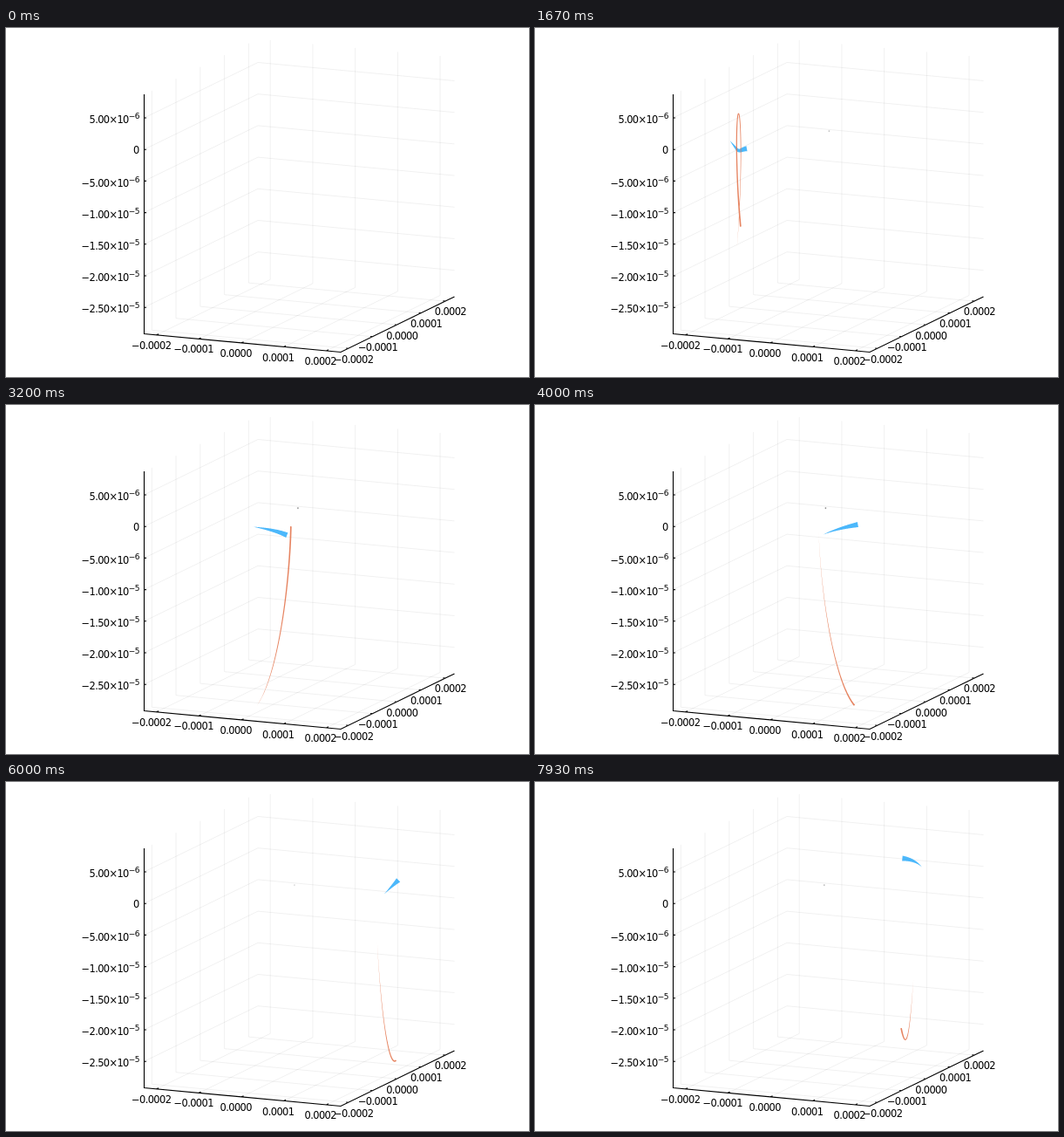
Animation of 600 by 400 pixels, one loop 8 s. Source, as an HTML page:

```html
<!DOCTYPE html>
<html lang="en">
<head>
<meta charset="utf-8">
<title>Orbit trails</title>
<style>
  html, body { margin: 0; width: 100%; height: 100%; overflow: hidden; background: #fff; }
  svg { display: block; width: 600px; height: 400px; }
  text { font: 11.4px "DejaVu Sans", sans-serif; letter-spacing: -.6px; fill: #000; }
  .sup { font-size: 9px; }
  path { fill: none; }
  #grid { stroke: #000; stroke-opacity: .06; }
  #axes { stroke: #000; stroke-width: 1.1; }
  #planet { fill: #009afa; fill-opacity: .7; }
  #moon { fill: #e26f46; fill-opacity: .85; }
</style>
</head>
<body>
<svg viewBox="0 0 600 400">
  <path id="grid"/>
  <path id="axes"/>
  <g id="labels"></g>
  <rect id="star" y="117.3" width="1.4" height="1.8" fill="#444"/>
  <path id="planet"/>
  <path id="moon"/>
</svg>
<script>
const $ = id => document.getElementById(id);
const { sin, cos, PI, hypot, max, min, round, floor } = Math;
const FRAME_COUNT = 120, LOOP = 8000, TRAIL = 10;

// ---- Axes box: u runs along the front, v into the depth, h is height in pixels
const HEIGHT = 274.5;
const project = (u, v, h = 0) => [158.5 + 225.5 * u + 130.5 * v, 350.5 + 21 * u - 63.5 * v - h];
const line = (...points) => "M" + points.map(p => p.map(n => n.toFixed(2)).join(" ")).join("L");
const decimal = (value, digits) => value.toFixed(digits).replace("-", "−");

function label(x, y, text, anchor, power) {
  const sup = power ? `<tspan class="sup" dy="-5">${power}</tspan>` : "";
  $("labels").innerHTML += `<text x="${x}" y="${y}" text-anchor="${anchor}">${text}${sup}</text>`;
}

function drawAxes() {
  let grid = "";
  let axes = line(project(0, 0, HEIGHT), project(0, 0), project(1, 0), project(1, 1));
  for (let i = 0; i < 5; i++) {
    const u = .063 + .216 * i, v = .067 + .213 * i, name = decimal((i - 2) / 1e4, 4);
    grid += line(project(u, 0), project(u, 1), project(u, 1, HEIGHT));
    grid += line(project(1, v), project(0, v), project(0, v, HEIGHT));
    axes += line(project(u, 0), project(u, .018)) + line(project(1, v), project(.989, v));
    label(166.7 + 48.5 * i, 367.7 + 4.6 * i, name, "middle");
    label(398.7 + 27.8 * i, 383.7 - 13.6 * i, name, "middle");
  }
  for (let i = 0; i < 7; i++) {
    const y = 103 + 36.2 * i, h = 350.5 - y, value = 5 - 5 * i, small = i < 3;
    grid += line(project(0, 0, h), project(0, 1, h), project(1, 1, h));
    axes += line([158.5, y], [161, y]);
    if (value === 0) label(152.6, y + 5, "0", "end");
    else label(152.8, y + 6.2, decimal(small ? value : value / 10, 2) + "×10", "end", small ? "−6" : "−5");
  }
  $("grid").setAttribute("d", grid);
  $("axes").setAttribute("d", axes);
}

// ---- Motion, with time counted in animation steps
const planetAngle = t => PI * (t - 5.5) / 91.5;

// Moon relative to the planet: an eccentric orbit, focus near its top, slowly changing shape
function moonOffset(t) {
  const u = t - 48.9;
  const turns = .0362 * u + 1.6e-5 * u * u;
  const near = 48.5 - 16 * cos(2 * PI * (u + 9) / 100);
  const far = 211 + 6 * cos(2 * PI * u / 110);
  const axis = (near + far) / 2, ecc = (far - near) / (far + near);
  const mean = 2 * PI * (turns - round(turns));
  let angle = mean + ecc * sin(mean);
  for (let i = 0; i < 6; i++)
    angle -= (angle - ecc * sin(angle) - mean) / (1 - ecc * cos(angle));
  const dy = axis * (ecc - cos(angle));
  return [-7.5 * sin(angle) - .0003 * (t - 40) * dy, dy];
}

// Planet on a tilted ellipse, pulled about by the moon
function planetAt(t) {
  const angle = planetAngle(t);
  return [
    335.5 - 118 * cos(angle),
    119.3 + 29 * sin(angle) + 5.7 * cos(angle) - .04 * moonOffset(t)[1]
  ];
}

function moonAt(t) {
  const [x, y] = planetAt(t), [dx, dy] = moonOffset(t);
  return [x + dx, y + dy];
}

// Ribbon that widens from nothing at its tail to the given width at its head
function ribbon(position, t, width) {
  if (t <= 0) return "";
  const count = 90, start = max(0, t - TRAIL), left = [], right = [];
  for (let i = 0; i <= count; i++) {
    const time = start + (t - start) * i / count;
    const [x, y] = position(time);
    const [x0, y0] = position(time - .04), [x1, y1] = position(time + .04);
    const length = hypot(x1 - x0, y1 - y0) || 1, half = width * i / count / 2;
    const nx = -(y1 - y0) / length * half, ny = (x1 - x0) / length * half;
    left.push([x + nx, y + ny]);
    right.unshift([x - nx, y - ny]);
  }
  return line(...left, ...right) + "Z";
}

function draw(now) {
  // Steps are timed in whole hundredths of a second, hence the small lead
  const t = floor((now % LOOP) / LOOP * FRAME_COUNT + .06) % FRAME_COUNT;
  $("planet").setAttribute("d", ribbon(planetAt, t, 6));
  $("moon").setAttribute("d", ribbon(moonAt, t, 1.7));
  // The star's short trail is only visible while it moves
  $("star").setAttribute("x", 333.8 + 3.7 * cos(planetAngle(t)));
  $("star").setAttribute("opacity", t < 14 ? 0 : .6 * Math.abs(sin(planetAngle(t - 3))));
}

drawAxes();
const begin = performance.now();
function tick() {
  draw(performance.now() - begin);
  requestAnimationFrame(tick);
}
tick();
</script>
</body>
</html>
```
